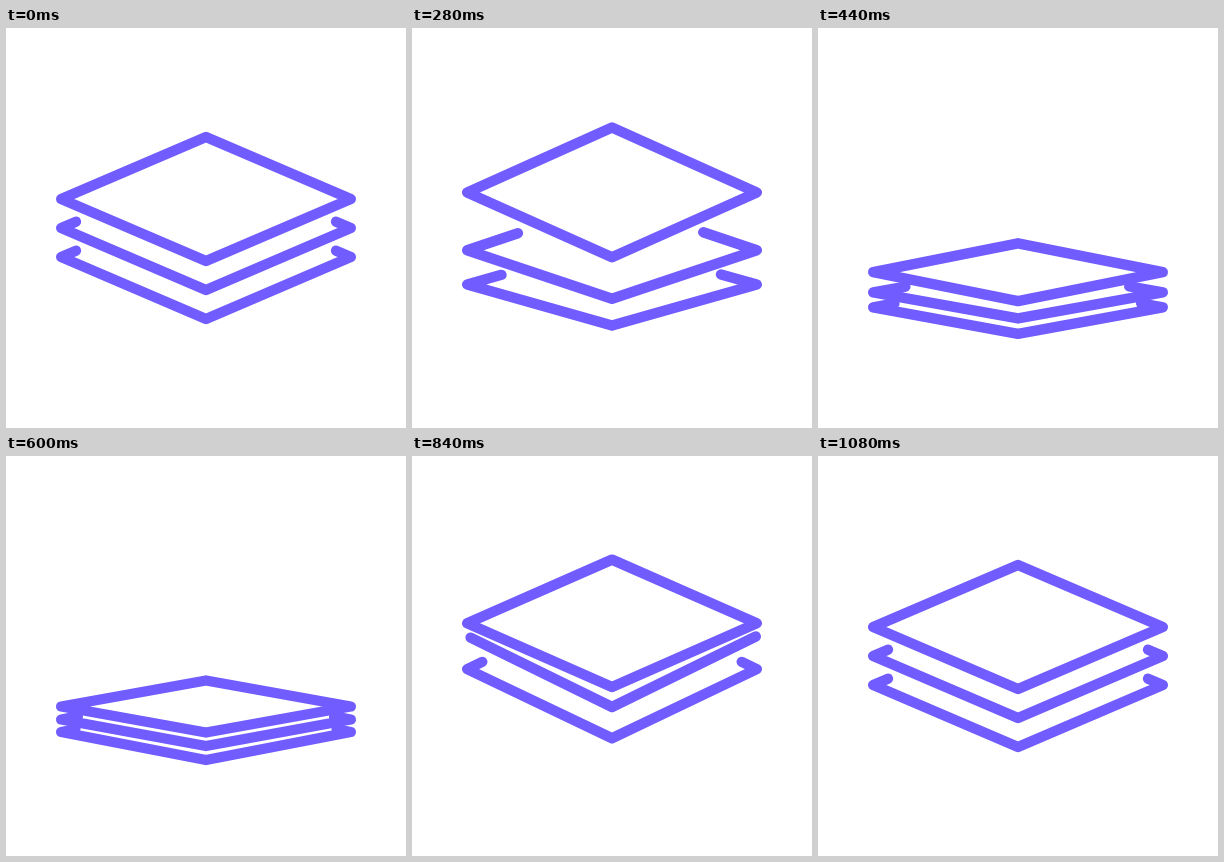
Write an HTML page that moves like this. It is 400x400 px and loops after 1.16 s.

```html
<!DOCTYPE html>
<html lang="en">
<head>
<meta charset="utf-8">
<title>Bouncing layers</title>
<style>
  html, body { margin: 0; width: 100%; height: 100%; overflow: hidden; background: #fff; }
  svg { display: block; width: 100%; height: 100%; }
  path { fill: none; stroke: #705cff; stroke-width: 10.4; stroke-linecap: round; stroke-linejoin: round; }
</style>
</head>
<body>
<svg viewBox="0 0 400 400"><path/><path/><path/></svg>
<script>
  const LOOP = 1160, STEP = 40;
  const LEFT = 55.2, RIGHT = 344.8, MID = 200, HALF = MID - LEFT;
  const REST_H = 62, LIFT = -20;

  // y: resting height, drop: way down, flat: lost half height, dip: overshoot at the bottom.
  // times: lifted, landed, settled, jump starts, jump peaks, at rest
  const layers = [
    { y: 171, drop: 79.5, flat: 36,   dip: 0, times: [220, 480, 600, 695, 890, 1080] },
    { y: 200, drop: 63.5, flat: 35.5, dip: 1, times: [170, 390, 600, 685, 840, 1080], minRight: -1 },
    { y: 229, drop: 47,   flat: 34,   dip: 4, times: [120, 380, 600, 600, 750, 1060] }
  ];
  const paths = document.querySelectorAll('path');

  const smooth = k => k * k * (3 - 2 * k);
  const mix = (a, b, k) => a + (b - a) * k;

  function pose({ y, drop, flat, dip, times }, t) {
    const stops = [0, ...times];
    const squash = [0, 0, 1, 1, 1, 0, 0];
    const shift = [0, LIFT, dip, 0, 0, LIFT, 0];
    let i = 0;
    while (i < stops.length - 2 && t >= stops[i + 1]) i++;
    const k = smooth(Math.min(1, (t - stops[i]) / (stops[i + 1] - stops[i])));
    const p = mix(squash[i], squash[i + 1], k);
    const u = mix(shift[i], shift[i + 1], k);
    return { y: y + p * drop + u, h: REST_H - p * flat - 0.45 * u };
  }

  const diamond = ({ y, h }) =>
    `M${MID} ${y - h}L${RIGHT} ${y}L${MID} ${y + h}L${LEFT} ${y}Z`;

  // A negative arm stops short of the side corner.
  function chevron({ y, h }, above, minRight = -Infinity) {
    const gap = HALF * (y - above.y) / (h + above.h);
    const left = Math.max(-HALF, 0.9 * gap - 15.7);
    const right = Math.max(-HALF, minRight, 15 + 1.08 * (left - 15));
    const end = a => y - a * h / HALF;
    const points = [[LEFT + Math.abs(left), end(left)]];
    if (left > 0) points.push([LEFT, y]);
    points.push([MID, y + h]);
    if (right > 0) points.push([RIGHT, y]);
    points.push([RIGHT - Math.abs(right), end(right)]);
    return 'M' + points.map(p => p.join(' ')).join('L');
  }

  function draw(t) {
    const poses = layers.map(layer => pose(layer, t));
    poses.forEach((p, i) => {
      const d = i ? chevron(p, poses[i - 1], layers[i].minRight) : diamond(p);
      paths[i].setAttribute('d', d);
    });
  }

  const start = performance.now();
  function tick() {
    const t = (performance.now() - start) % LOOP;
    draw(Math.floor(t / STEP) * STEP);
    requestAnimationFrame(tick);
  }
  tick();
</script>
</body>
</html>
```
